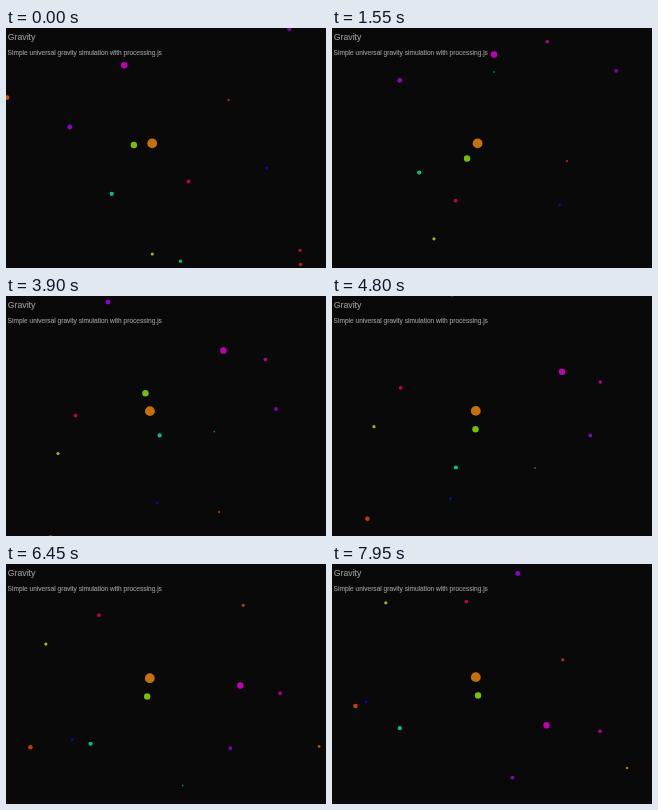
Animation, 320 px wide and 240 px high, one loop 8000 ms. Source, as an HTML page:

```html
<!DOCTYPE html>
<html lang="en">
<head>
<meta charset="utf-8">
<title>Gravity</title>
<style>
  html, body { margin: 0; width: 100%; height: 100%; overflow: hidden; background: #090909; }
  svg { display: block; width: 100vw; height: 100vh; }
  text { font-family: "Liberation Sans", Arial, sans-serif; fill: #999; stroke: #999; stroke-width: 0.12; }
</style>
</head>
<body>
<svg viewBox="0 0 320 240">
  <rect width="320" height="240" fill="#090909"/>
  <g id="bodies"></g>
  <text x="1.7" y="12" font-size="8.76">Gravity</text>
  <text x="1.6" y="27" font-size="6.57">Simple universal gravity simulation with processing.js</text>
</svg>
<script>
const LOOP = 8000, STEP = 50;
const GM = 0.085; // px³/ms²
const TAU = 2 * Math.PI, RAD = Math.PI / 180;
const layer = document.getElementById('bodies');
const bodies = [];

// The star wobbles slightly as the others tug at it
function star(t) {
  const ease = (1 + Math.cos(Math.PI * Math.min(1, t / 4500))) / 2;
  return [143.8 + 2.4 * ease, 115.4 - 2.3 * (t / LOOP) ** 3];
}

function around(t, r, angle) {
  const [x, y] = star(t);
  return [x + r * Math.cos(angle), y + r * Math.sin(angle)];
}

function pull([x, y], t) {
  const [sx, sy] = star(t), dx = sx - x, dy = sy - y;
  const k = GM / Math.hypot(dx, dy) ** 3;
  return [dx * k, dy * k];
}

// Free fall from one [t, x, y] to another: integrate the pull twice,
// shift the result to meet both ends, repeat until it settles
function arc([t0, ...from], [t1, ...to]) {
  const n = (t1 - t0) / STEP;
  const lerp = (k, c) => from[c] + (to[c] - from[c]) * k / n;
  const path = Array.from({ length: n + 1 }, (_, k) => [lerp(k, 0), lerp(k, 1)]);
  for (let pass = 0; pass < 80; pass++) {
    const force = path.map((p, k) => pull(p, t0 + k * STEP));
    for (const c of [0, 1]) {
      const fall = [0, 0];
      for (let k = 1; k < n; k++) {
        fall[k + 1] = 2 * fall[k] - fall[k - 1] + STEP * STEP * force[k][c];
      }
      path.forEach((p, k) => {
        p[c] += 0.4 * (lerp(k, c) + fall[k] - fall[n] * k / n - p[c]);
      });
    }
  }
  return path;
}

function fall(...keys) {
  const path = [];
  for (let i = 1; i < keys.length; i++) {
    arc(keys[i - 1], keys[i]).forEach((p, k) => { path[keys[i - 1][0] / STEP + k] = p; });
  }
  return t => path[t / STEP];
}

// A body in view for the whole loop: start, middle and end
const tour = (a, b, c) => fall([0, ...a], [3900, ...b], [7950, ...c]);

// Kepler ellipse, clockwise; t counts from the closest approach
function ellipse(t, a, e, period, tilt) {
  const mean = TAU * t / period;
  let E = mean + e * Math.sin(mean);
  for (let i = 0; i < 8; i++) E -= (E - e * Math.sin(E) - mean) / (1 - e * Math.cos(E));
  const angle = 2 * Math.atan2(Math.sqrt(1 + e) * Math.sin(E / 2), Math.sqrt(1 - e) * Math.cos(E / 2));
  return [a * (1 - e * Math.cos(E)), angle + tilt];
}

const moon = t => around(t, 18.4, (175 + 0.19627 * t + 2.336e-6 * t * t) * RAD);

// The close pass flings the comet onto a wider ellipse
function comet(t) {
  const s = t - 3553, tilt = 321.5 * RAD;
  const shape = s < 0 ? [40, 0.72, 5506] : [52, 0.78, 7794];
  return around(t, ...ellipse(s, ...shape, tilt));
}

function body(color, r, at) {
  const dot = document.createElementNS('http://www.w3.org/2000/svg', 'circle');
  dot.setAttribute('r', r);
  dot.setAttribute('fill', color);
  layer.append(dot);
  bodies.push({ dot, at });
}

body('#c87008', 4.9, star);
body('#74c000', 3.2, moon);
body('#00be92', 2.1, comet);

body('#be00b4', 3.2, tour([118.2, 37.3], [217.4, 54.5], [214.5, 161.2]));
body('#9200c4', 2.4, tour([63.8, 99], [102, 6], [185.8, 9.5]));
body('#8600be', 1.9, tour([283.3, 1], [270, 113], [180.4, 213.6]));
body('#b4008c', 1.8, tour([176, -6], [259.3, 63.6], [268, 167.2]));
body('#c00046', 1.9, tour([182.5, 153.5], [69.6, 119.6], [134.3, 37.6]));
body('#a4b414', 1.6, tour([146.3, 226], [52, 157.5], [53.8, 38.8]));
body('#0a0a9c', 1.5, tour([260.8, 140], [151, 206.8], [34, 137.8]));
body('#00825a', 0.9, tour([108, 22.8], [208.3, 135.6], [147, 251]));

// Leaving the view
body('#b41e10', 1.2, fall([0, 222.6, 72], [3900, 213, 216], [5000, 195, 247]));
body('#c85400', 2.4, fall([0, 1, 69.6], [800, -6, 52]));
body('#00be50', 1.8, fall([0, 174.5, 233.3], [1550, 134, 246]));
body('#c01c10', 1.5, fall([0, 294, 222.2], [1550, 285, 250]));
body('#be1420', 1.8, fall([0, 294.6, 236.6], [1550, 284, 264]));

// Entering it
body('#c23c0a', 2.3, fall([3600, 48, 247.3], [7950, 23.5, 142]));
body('#00be78', 1.6, fall([5200, 15.2, 245.7], [7150, -9.5, 205]));
body('#b8320c', 1.6, fall([5000, 232.6, -3.7], [7950, 230.8, 95.8]));
body('#c06a0c', 1.3, fall([5400, 322.6, 166], [7950, 295, 204]));

function draw(t) {
  for (const { dot, at } of bodies) {
    const p = at(t);
    dot.setAttribute('visibility', p ? 'visible' : 'hidden');
    if (!p) continue;
    dot.setAttribute('cx', p[0].toFixed(2));
    dot.setAttribute('cy', p[1].toFixed(2));
  }
}

const start = performance.now();
function tick() {
  const t = (performance.now() - start) % LOOP;
  draw(Math.floor(t / STEP) * STEP);
  requestAnimationFrame(tick);
}
draw(0);
requestAnimationFrame(tick);
</script>
</body>
</html>
```
